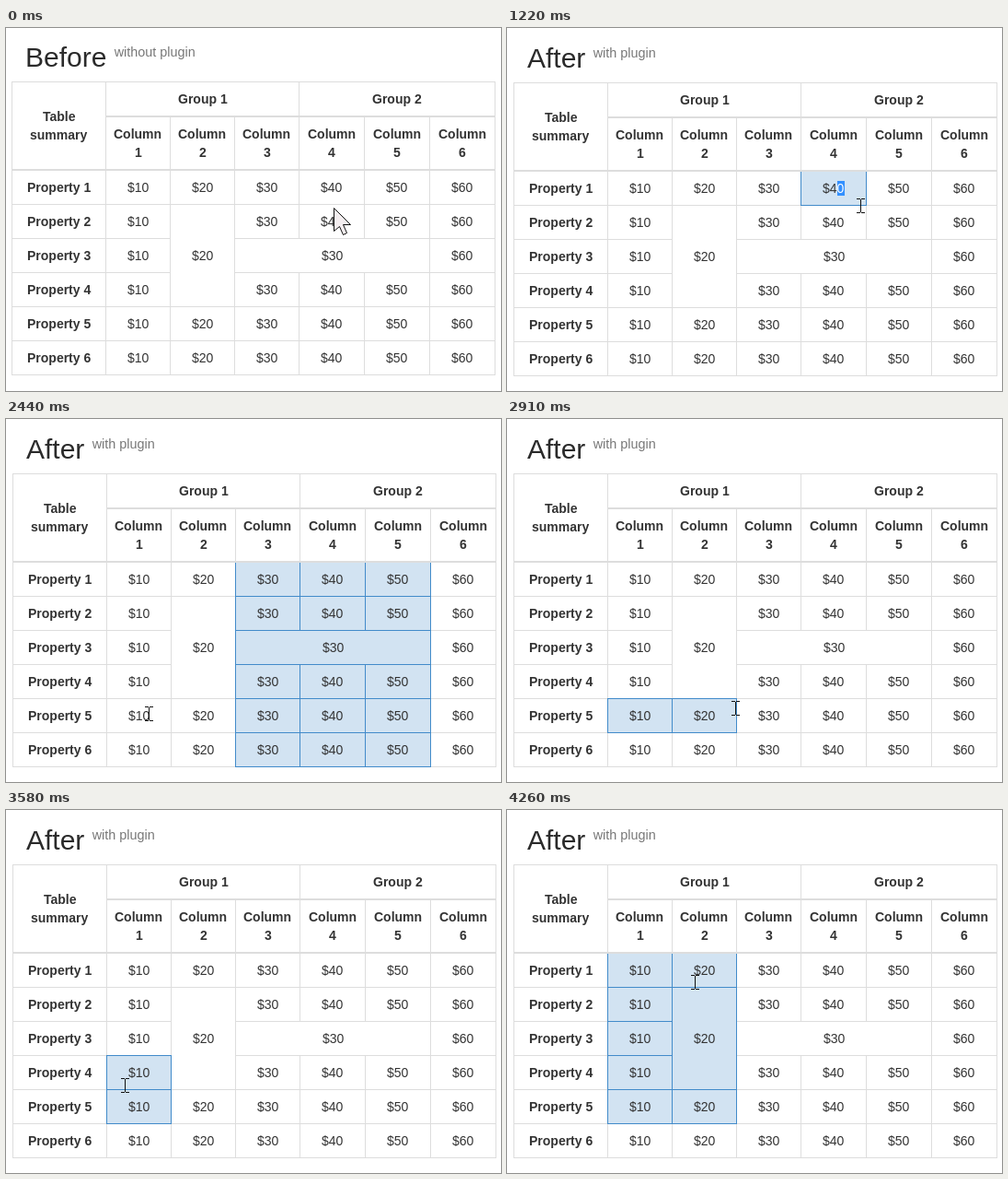
Recreate the animation shown at these times as an HTML page with a canvas. Size 538 px wide and 394 px high, loop 4360 ms.

```html
<!DOCTYPE html>
<html lang="en">
<head>
<meta charset="utf-8">
<title>Table cell selection</title>
<style>
  html, body { margin: 0; width: 100%; height: 100%; overflow: hidden; background: #fff; }
  canvas { display: block; }
</style>
</head>
<body>
<canvas id="stage" width="538" height="394"></canvas>
<script>
const ctx = document.getElementById('stage').getContext('2d');
const LOOP = 4360, STEP = 76.05, LAST = 56, SWITCH = 11;
const FONT = '"Liberation Sans", Arial, sans-serif';
const TABLE_TOP = 52, HEAD = 38, BODY = 96;

// Left edge of a column and top edge of a row; the last three columns are 1px wider.
const colX = c => c && 32 + 70 * c + Math.max(0, c - 4);
const rowY = r => r < 2 ? r * HEAD : BODY + 37 * (r - 2);

// Cells in document order; r2 and c2 are the last row and column covered.
const cells = [];
const covers = (b, r, c) => r >= b.r && r <= b.r2 && c >= b.c && c <= b.c2;
function add(text, r, c, rowSpan = 1, colSpan = 1) {
  if (cells.some(b => covers(b, r, c))) return;
  cells.push({ text, r, c, r2: r + rowSpan - 1, c2: c + colSpan - 1, bold: r < 2 || c === 0 });
}
add('Table summary', 0, 0, 2);
add('Group 1', 0, 1, 1, 3);
add('Group 2', 0, 4, 1, 3);
for (let c = 1; c < 7; c++) add('Column ' + c, 1, c);
for (let r = 2; r < 8; r++) {
  add('Property ' + (r - 1), r, 0);
  for (let c = 1; c < 7; c++)
    add(`$${c}0`, r, c, c === 2 && r === 3 ? 3 : 1, c === 3 && r === 4 ? 3 : 1);
}
const firstPressed = cells.find(b => covers(b, 2, 4));

// Pointer turning points, with the steps it rests there.
const path = [
  { at: 0, x: 356, y: 195 },
  { at: 2, x: 359, y: 176 },
  { at: 10, x: 440, y: 360 },
  { at: 14, x: 361, y: 176 },
  { at: 16, x: 384, y: 193 },
  { at: 23, x: 430, y: 252 },
  { at: 28, x: 425, y: 358 },
  { at: 32, x: 155, y: 320 },
  { at: 33, x: 145, y: 321, rest: 1 },
  { at: 43, x: 377, y: 305 },
  { at: 47, x: 129, y: 299, rest: 1 },
  { at: 52, x: 205, y: 262, rest: 1 },
  { at: LAST, x: 204, y: 187 }
];
const drags = [{ press: 15, release: 28 }, { press: 33, release: LAST }];

function pointer(step) {
  const i = path.findIndex(p => p.at >= step);
  const to = path[i], from = path[Math.max(0, i - 1)];
  const start = from.at + (from.rest || 0);
  const k = to.at > start ? Math.max(0, step - start) / (to.at - start) : 1;
  const mix = (a, b) => Math.round(a + (b - a) * k);
  return [mix(from.x, to.x), mix(from.y, to.y)];
}

const bounds = b => [colX(b.c), rowY(b.r), colX(b.c2 + 1), rowY(b.r2 + 1)];

function cellAt([px, py], origin) {
  const x = px - origin, y = py - 3 - origin - TABLE_TOP;
  return cells.find(b => {
    const [x0, y0, x1, y1] = bounds(b);
    return x >= x0 && x < x1 && y >= y0 && y < y1;
  });
}

// Grow the range until no merged cell is cut.
function cellsBetween(a, b) {
  let picked = [a, b], size;
  do {
    size = picked.length;
    const edge = (fn, key) => Math[fn](...picked.map(q => q[key]));
    const r = edge('min', 'r'), r2 = edge('max', 'r2');
    const c = edge('min', 'c'), c2 = edge('max', 'c2');
    picked = cells.filter(q => q.r <= r2 && q.r2 >= r && q.c <= c2 && q.c2 >= c);
  } while (picked.length !== size);
  return picked;
}

function rect(color, x, y, w, h) {
  ctx.fillStyle = color;
  ctx.fillRect(x, y, w, h);
}

function label(text, x, y, font, color) {
  ctx.font = `${font} ${FONT}`;
  ctx.fillStyle = color;
  ctx.fillText(text, x, y);
}

function drawBorder(b) {
  const [x0, y0, x1, y1] = bounds(b);
  for (const y of [y0, y1]) {
    const weight = y === HEAD || y === BODY ? 2 : 1;
    rect('#ddd', x0, y - weight + 1, x1 - x0 + 1, weight);
  }
  for (const x of [x0, x1]) rect('#ddd', x, y0, 1, y1 - y0);
}

function drawSelected(b) {
  const [x0, y0, x1, y1] = bounds(b), line = '#428bca';
  rect('#d2e3f2', x0 + 1, y0 + 1, x1 - x0 - 1, y1 - y0 - 1);
  for (const y of [y0, y1]) if (y !== BODY) rect(line, x0, y, x1 - x0 + 1, 1);
  for (const x of [x0, x1]) rect(line, x, y0 + 1, 1, y1 - y0);
}

// Text from character `mark` on is highlighted.
function drawText(b, mark = Infinity) {
  const [x0, y0, x1, y1] = bounds(b);
  const lines = b.r2 === 1 ? b.text.split(' ') : [b.text];
  const font = b.bold ? 'bold 14px' : '14px';
  const top = Math.floor((y0 + y1 + 1) / 2) - lines.length * 10;
  lines.forEach((line, i) => {
    ctx.font = `${font} ${FONT}`;
    const width = ctx.measureText(line).width;
    const x = Math.round((x0 + x1 + 1 - width) / 2), y = top + 15 + i * 20;
    label(line, x, y, font, '#333');
    if (mark < line.length) {
      const start = x + ctx.measureText(line.slice(0, mark)).width;
      rect('#3390ff', Math.round(start), y - 13, Math.ceil(x + width - start), 16);
      label(line.slice(mark), start, y, font, '#fff');
    }
  });
}

const arrow = new Path2D('M.5 .5v25l6 -5 4 9 4 -2 -4 -9h8z');
function drawArrow(x, y) {
  ctx.save();
  ctx.translate(x, y);
  ctx.fillStyle = '#f4eef0';
  ctx.strokeStyle = '#111';
  ctx.fill(arrow);
  ctx.stroke(arrow);
  ctx.restore();
}

function drawBeam(x, y) {
  rect('#111', x, y - 7, 1, 14);
  for (const edge of [y - 8, y + 7])
    for (const side of [x - 4, x + 1]) rect('#111', side, edge, 4, 1);
}

function draw(step) {
  const after = step >= SWITCH, origin = after ? 7 : 6;
  const under = s => cellAt(pointer(s), origin);
  const marks = new Map();
  let selected = [];

  if (after) {
    const drag = drags.filter(d => step >= d.press).pop();
    if (drag) selected = cellsBetween(under(drag.press), under(Math.min(step, drag.release)));
    if (selected.length === 1 && selected[0] === firstPressed) marks.set(firstPressed, 2);
  } else if (step > 2) {
    const first = cells.indexOf(firstPressed), last = cells.indexOf(under(step));
    cells.slice(first, last + 1).forEach((b, i) => marks.set(b, i ? 0 : 2));
  }

  rect('#fff', 0, 0, 538, 394);
  const title = after ? 'After' : 'Before', left = origin + 15;
  label(title, left, origin + 36, '30px', '#2b2b2b');
  const next = left + ctx.measureText(title + ' ').width;
  label(after ? 'with plugin' : 'without plugin', next, origin + 25, '14.4px', '#777');

  ctx.save();
  ctx.translate(origin, origin + TABLE_TOP);
  cells.forEach(drawBorder);
  selected.forEach(drawSelected);
  cells.forEach(b => drawText(b, marks.get(b)));
  ctx.restore();
  (step === 0 ? drawArrow : drawBeam)(...pointer(step));
}

function tick() {
  const time = performance.now() % LOOP;
  draw(Math.min(LAST, Math.floor((time + 4) / STEP)));
  requestAnimationFrame(tick);
}
tick();
</script>
</body>
</html>
```
